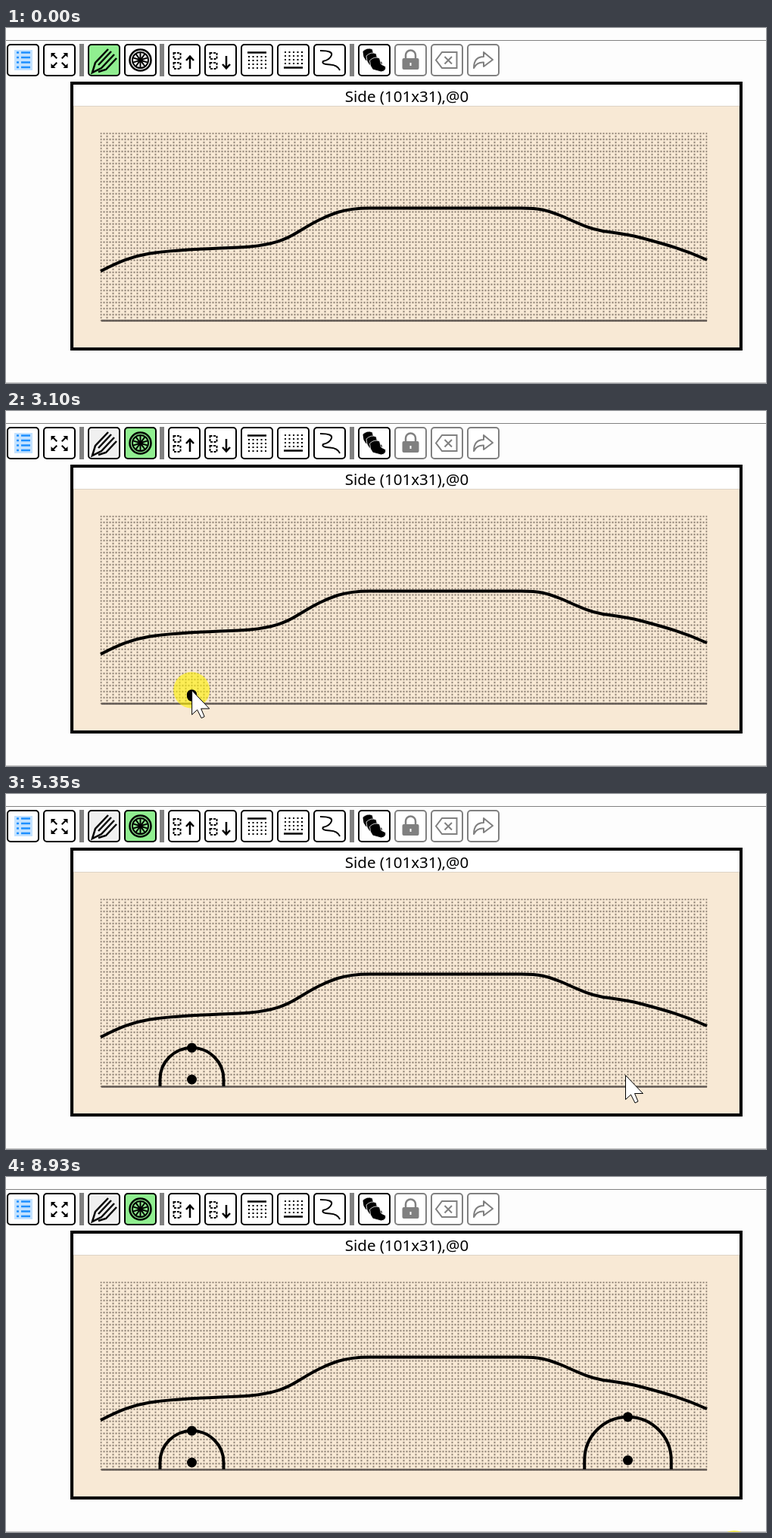
An HTML page for the animation above (9 s loop, 1004 by 470 pixels).

```html
<!DOCTYPE html>
<html lang="en">
<head>
<meta charset="utf-8">
<title>Wheel arches</title>
<style>
  html, body { margin: 0; width: 100%; height: 100%; overflow: hidden; background: #fdfdfd; }
  svg { display: block; }
  .line { fill: none; stroke: #000; stroke-width: 2; }
  .gray { stroke: #808080; }
  .thick { stroke-width: 4; stroke-linejoin: round; }
  .bold { stroke-width: 2.5; }
</style>
</head>
<body>
<svg width="1004" height="470" viewBox="0 0 1004 470">
  <defs>
    <pattern id="grid" x="124.5" y="138.5" width="8" height="8" patternUnits="userSpaceOnUse">
      <path d="M0 0h2v2h-2zM4 0h2v2h-2zM0 4h2v2h-2z" fill="#85796c"/>
    </pattern>
    <g id="blocks" class="line" stroke-dasharray="3 1.5">
      <rect x="7.500" y="12" width="9" height="8"/>
      <rect x="7.500" y="25" width="9" height="8"/>
    </g>
    <path id="dots" d="M0 0H24M0 5H24M0 10H24M0 15H24" class="line" stroke-dasharray="2 3.5"/>
    <path id="corner" d="M-11 -10h6l-2 2 4.500 4.500-1.500 1.500-4.500-4.500-2.500 2.500z"/>
    <path id="seat" d="M0 4Q6 -2 13 1L15 9 21 12Q22 18 15 19L4 16 1 11z" stroke="#fff" stroke-width=".8"/>
  </defs>

  <path d="M0 16.500H1004" class="gray"/>
  <path d="M0 469.500H1004" stroke="#c4c4c4"/>
  <g id="toolbar"></g>

  <g transform="translate(1 21)">
    <rect x="10" y="8" width="24" height="27" fill="#c3e2ff"/>
    <path d="M13 11.500h3m3 0h12M13 18h3m3 0h12M13 24.500h3m3 0h12M13 31h3m3 0h12" stroke="#1e90ff" stroke-width="2.500"/>
  </g>
  <g transform="translate(70.500 43)">
    <use href="#corner"/><use href="#corner" transform="scale(-1 1)"/>
    <use href="#corner" transform="scale(1 -1)"/><use href="#corner" transform="scale(-1 -1)"/>
  </g>
  <path class="line bold" transform="translate(108 21)" d="M27 7L10 25 6 38 18 32 35 14M31 10L14 28M38 19L24 34 14 37"/>
  <g id="spokes" class="line" transform="translate(177.500 42.500)">
    <circle r="14" class="bold"/>
    <circle r="10.500"/>
    <circle r="2.500" fill="#000"/>
  </g>
  <g transform="translate(214 21)">
    <use href="#blocks"/><path d="M29 33V17M24 22L29 16.500 34 22" class="line bold"/>
  </g>
  <g transform="translate(262 21)">
    <use href="#blocks"/><path d="M29 16V32M24 27L29 32.500 34 27" class="line bold"/>
  </g>
  <path d="M319 32.500H344M367 52.500H392" class="line bold"/>
  <use href="#dots" x="320" y="38"/>
  <use href="#dots" x="368" y="32"/>
  <path d="M415 30Q432 30 430 36T419 44Q416 48 428 48.500Q438 49 441 56" class="line"/>
  <g transform="translate(471 27)">
    <use href="#seat"/><use href="#seat" x="5" y="6"/><use href="#seat" x="9.500" y="12"/>
  </g>
  <rect x="523.500" y="40" width="22" height="15" rx="2" fill="#808080"/>
  <path d="M528 41V36a6.500 6.500 0 0 1 13 0V41" class="line gray bold"/>
  <path d="M534.500 46V50" class="line" style="stroke: #fff"/>
  <path d="M568 42.500L576 32H595.500V53H576zM579.500 38L589 47.500M589 38L579.500 47.500" class="line gray"/>
  <path d="M618 53Q618 38 631 38V32L643 42 631 51V45.500Q622 45 618 53z" class="line gray" stroke-linejoin="round"/>

  <rect x="87" y="73" width="884" height="352" fill="#fff" stroke="#000" stroke-width="4"/>
  <rect x="89.500" y="103.500" width="879" height="319" fill="#f8e9d5" stroke="#ddd3c6"/>
  <text x="529.500" y="98" text-anchor="middle" font-size="20.500" font-family="'Noto Sans', 'Open Sans', sans-serif">Side (101x31),@0</text>
  <rect x="124.500" y="138.500" width="802" height="250" fill="url(#grid)"/>
  <path d="M126 387.500H926" stroke="#625a54" stroke-width="2.500"/>
  <path class="line thick" d="M125 322C150 309 168 302 190 298.500C230 292 290 292 322 289.500C352 286.500 368 281 385 270.500C402 260 417 251 438 244C453 239.500 463 238.500 480 238.500H680C706 238.500 714 241 733 248.500C753 257 766 264.500 789 269C810 272 820 273 838 277.500C870 286 895 293 926 307"/>
  <circle id="glow" r="24" fill="#fff000" opacity=".6"/>
  <g id="arches"></g>
  <path id="cursor" d="M.5 .5V32.500L7.500 26 13 37 17 35 12.500 24.500H23.500z" fill="#fff" stroke="#000"/>
</svg>
<script>
const LOOP = 9000, STEP = 78, BASE = 387, LAG = 150;
const $ = id => document.getElementById(id);
const add = (parent, tag, attrs = {}) => {
  const el = document.createElementNS(parent.namespaceURI, tag);
  for (const name in attrs) el.setAttribute(name, attrs[name]);
  return parent.appendChild(el);
};

// Toolbar: groups of buttons with a bar between them.
const buttons = [];
[2, 2, 5, 4].forEach((size, group) => {
  for (let i = 0; i < size; i++) {
    const x = Math.round(2 + 48 * buttons.length + 10.7 * group);
    if (group && !i) add($('toolbar'), 'rect', { x: x - 12, y: 21, width: 6, height: 43, fill: '#808080' });
    buttons.push(add($('toolbar'), 'rect', { x, y: 22, width: 41, height: 41, rx: 4, fill: '#fff',
      stroke: x > 500 ? '#808080' : '#000', 'stroke-width': 2 }));
  }
});
const [, , pencilButton, wheelButton] = buttons;

for (let angle = 0; angle < 360; angle += 36)
  add($('spokes'), 'path', { d: 'M0 -3V-10', transform: `rotate(${angle})` });

// The cursor glides to each stop in turn; only the entry is bowed.
const entry = { x: 690, y: 470 };
const stops = [
  { from: 150, to: 1000, x: 190, y: 63, bow: { x: -35, y: 400 } },
  { from: 1070, to: 1230, x: 171, y: 46 },
  { from: 1860, to: 2550, x: 245, y: 375 },
  { from: 3100, to: 3560, x: 246, y: 337 },
  { from: 3710, to: 4400, x: 248, y: 334 },
  { from: 4570, to: 4880, x: 829, y: 368 },
  { from: 5260, to: 5350, x: 818, y: 372 },
  { from: 5730, to: 6530, x: 819, y: 315 },
  { from: 7780, to: 8070, x: 962, y: 492 }
];
const frontDrag = { down: 2870, up: 4570 }, rearDrag = { down: 5580, up: 7460 };
const presses = [{ down: 1380, up: 1450 }, frontDrag, rearDrag, { down: 8930, up: LOOP }];
const wheels = [{ x: 245.5, y: 378, drag: frontDrag }, { x: 821.5, y: 375, drag: rearDrag }];

for (const wheel of wheels) {
  const dot = { cx: wheel.x, cy: wheel.y, r: 6.5 };
  wheel.group = add($('arches'), 'g');
  wheel.arch = add(wheel.group, 'path', { class: 'line thick' });
  add(wheel.group, 'circle', dot);
  wheel.top = add(wheel.group, 'circle', dot);
}

const mix = (a, b, u) => ({ x: a.x + (b.x - a.x) * u, y: a.y + (b.y - a.y) * u });

function cursorAt(t) {
  const index = stops.findLastIndex(stop => stop.from <= t);
  if (index < 0) return { x: entry.x, y: entry.y + 40 };
  const start = stops[index - 1] || entry, stop = stops[index];
  const steps = Math.round((stop.to - stop.from) / STEP);
  const progress = Math.min(1, (t - stop.from) / (stop.to - stop.from));
  const u = (Math.floor(progress * steps + 1e-6) + 1) / (steps + 1);
  return stop.bow ? mix(mix(start, stop.bow, u), mix(stop.bow, stop, u), u) : mix(start, stop, u);
}

function draw(t) {
  const { x, y } = cursorAt(t);
  for (const id of ['cursor', 'glow']) $(id).setAttribute('transform', `translate(${x} ${y})`);
  $('glow').style.display = presses.some(({ down, up }) => t >= down && t < up) ? '' : 'none';

  pencilButton.setAttribute('fill', t < 1630 ? '#90ee90' : '#f0f0f0');
  wheelButton.setAttribute('fill',
    t < 1150 ? '#fff' : t < 1630 ? '#ddd' : t < 1935 ? '#008000' : '#90ee90');

  // Each arch follows the dragging cursor a little late.
  for (const { x, y, drag, group, arch, top } of wheels) {
    const pull = y - cursorAt(Math.min(t - LAG, drag.up - 1)).y;
    const r = t - LAG < drag.down ? 0 : Math.max(0, 0.955 * pull);
    group.style.display = t >= drag.down ? '' : 'none';
    arch.setAttribute('d', r > 4 ? `M${x - r} ${BASE}V${y}a${r} ${r} 0 0 1 ${2 * r} 0V${BASE}` : '');
    top.setAttribute('cy', y - r);
  }
}

const began = performance.now();
function tick() {
  draw((performance.now() - began) % LOOP);
  requestAnimationFrame(tick);
}
tick();
</script>
</body>
</html>
```
